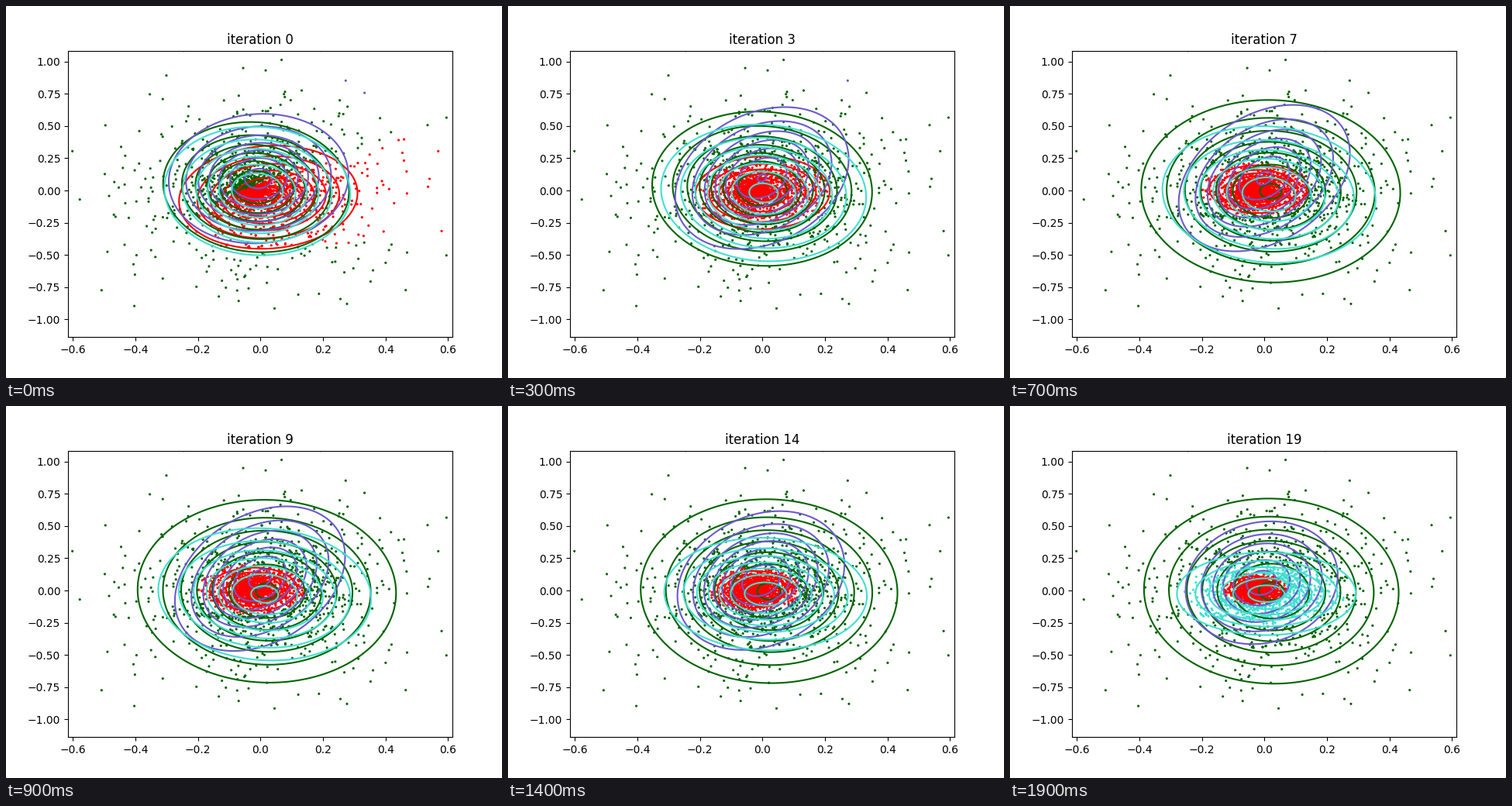
Animation, 640 px wide and 480 px high, one loop 2000 ms. Source, as a matplotlib script:

```python
import numpy as np
import matplotlib.pyplot as plt
from matplotlib.animation import FuncAnimation

FRAMES, INTERVAL = 20, 100
XLIM, YLIM = (-0.61582, 0.61408), (-1.1367, 1.0841)
PIVOT = 5.5  # iteration at which the spread-out phase ends


class Component:
    """A Gaussian that eases from start to mid, then settles at end.

    A pose is mean x, mean y, sigma x, sigma y, correlation.
    """

    def __init__(self, color, pace, log_weight, start, mid, end):
        self.color, self.pace, self.log_weight = color, pace, log_weight
        self.start, self.mid, self.end = map(np.array, (start, mid, end))

    def pose(self, i):
        if i < PIVOT:
            t = (i / PIVOT) ** self.pace
            return self.start + (self.mid - self.start) * t
        t = ((i - PIVOT) / (FRAMES - 1 - PIVOT)) ** 1.3
        return self.mid + (self.end - self.mid) * t

    def log_pdf(self, i, x, y):
        mx, my, sx, sy, rho = self.pose(i)
        u, v, k = (x - mx) / sx, (y - my) / sy, 1 - rho ** 2
        dist = (u * u - 2 * rho * u * v + v * v) / k
        return -dist / 2 - np.log(2 * np.pi * sx * sy * np.sqrt(k))


def late_gain(i):
    return -0.8 + 0.6 * np.clip((i - 12) / 7, 0, 1)


COMPONENTS = [
    Component("red", 1.0, lambda i: 0.0,
              (0.025, -0.052, 0.147, 0.206, 0.08),
              (-0.020, 0.010, 0.080, 0.095, 0.0),
              (-0.028, 0.008, 0.042, 0.050, 0.0)),
    Component("darkgreen", 1.6, lambda i: 0.1,
              (-0.014, 0.026, 0.152, 0.258, -0.06),
              (0.020, -0.006, 0.2095, 0.357, -0.02),
              (0.022, -0.005, 0.2055, 0.362, -0.02)),
    Component("slateblue", 0.55, lambda i: -1.0,
              (-0.006, 0.092, 0.144, 0.2515, 0.05),
              (0.000, 0.098, 0.139, 0.289, 0.35),
              (-0.009, 0.060, 0.126, 0.2464, 0.12)),
    Component("turquoise", 1.0, late_gain,
              (-0.010, -0.004, 0.151, 0.253, -0.04),
              (0.015, -0.031, 0.176, 0.277, -0.08),
              (0.006, -0.025, 0.148, 0.166, 0.0)),
]
COLORS = np.array([c.color for c in COMPONENTS])


def make_points():
    """Nested clouds: a tight core inside ever wider, sparser ones."""
    rng = np.random.default_rng(7)
    layers = [(480, -0.026, 0.030, 0.042), (480, -0.015, 0.070, 0.085),
              (480, 0.0, 0.115, 0.150), (450, 0.01, 0.175, 0.300),
              (260, 0.01, 0.250, 0.420)]
    return np.vstack([rng.normal((mx, 0.004), (sx, sy), (n, 2))
                      for n, mx, sx, sy in layers])


def cluster_colors(i):
    scores = [c.log_pdf(i, *points.T) + c.log_weight(i) for c in COMPONENTS]
    return COLORS[np.argmax(scores, axis=0)]


def update(i):
    ax.clear()
    ax.scatter(*points.T, s=5.2, c=cluster_colors(i), linewidths=0)
    for c in COMPONENTS:
        ax.contour(gx, gy, np.exp(c.log_pdf(i, gx, gy)), colors=c.color)
    ax.set(xlim=XLIM, ylim=YLIM, title=f"iteration {i}")


points = make_points()
gx, gy = np.meshgrid(np.linspace(*XLIM, 200), np.linspace(*YLIM, 200))
fig, ax = plt.subplots(figsize=(6.4, 4.8), dpi=100)
anim = FuncAnimation(fig, update, frames=FRAMES, interval=INTERVAL,
                     repeat=True, repeat_delay=0)
plt.show()
```
